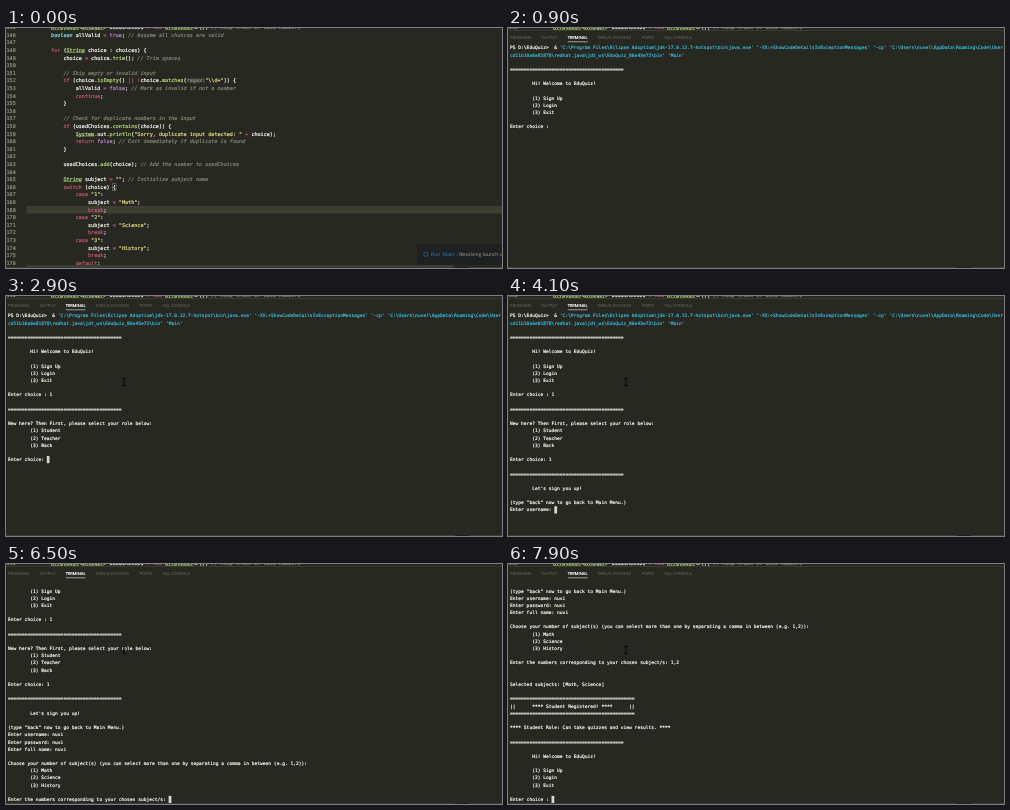
An HTML page that plays this animation: 496x240 px, repeating every 8 s.

```html
<!DOCTYPE html>
<html lang="en">
<head>
<meta charset="utf-8">
<title>Quiz terminal session</title>
<style>
  html, body { margin: 0; width: 100%; height: 100%; overflow: hidden; background: #272822; }
  /* Laid out at ten times the size so rows and glyphs can sit between pixels. */
  #stage {
    position: absolute; left: 0; top: 0; width: 4960px; height: 2400px; overflow: hidden;
    transform: scale(.1); transform-origin: 0 0;
    background: #272822; color: #fafaf4; text-rendering: geometricPrecision;
  }
  #stage > *, #panel > *, #cursor { position: absolute; }
  pre { margin: 0; font-family: "DejaVu Sans Mono", monospace; white-space: pre; -webkit-text-stroke: 2px; }

  #code, #numbers { top: -44px; font-size: 51.2px; line-height: 76px; }
  #code { left: 204px; }
  #numbers { left: 5px; color: #90918a; }
  #current { left: 205px; right: 0; top: 1780px; height: 76px; background: #3e3d32; }
  #scrollbar { left: 205px; width: 4265px; top: 2370px; height: 30px; background: #3a3b33; }
  .comment { color: #86826f; font-style: italic; }
  .string { color: #e6db84; }
  .keyword { color: #c0566f; }
  .constant { color: #b884d0; }
  .storage { color: #80dcf0; font-style: italic; }
  .type { color: #bcdc94; text-decoration: underline #a6d83e; }
  .call { color: #b4dc70; }
  .hint { color: #8b8b80; background: #34352e; }
  .bracket { outline: 5px solid #8c8c78; }

  #panel {
    left: 0; right: 0; top: 20px; bottom: 0; background: #272822;
    border-top: 6px solid #414339; box-sizing: border-box; animation: panel 8s infinite;
  }
  #tabs {
    left: 20px; top: 19px; display: flex; gap: 102px; white-space: nowrap;
    font: 41px/90px "Open Sans", sans-serif; color: #74756c;
  }
  #tabs b { font-weight: 400; color: #fff; border-bottom: 7px solid #d0d0c8; -webkit-text-stroke: 2px; }
  #terminal { left: 20px; top: 136px; font-size: 46px; line-height: 71.9px; }
  #terminal i { font-style: normal; color: #3cb4d4; }
  #cursor { width: 1ch; height: 1lh; background: #d8d8d0; }

  #toast {
    left: 4110px; top: 2160px; width: 900px; height: 210px; background: #1e2021;
    font: 50px/210px "Open Sans", sans-serif; color: #a4a59f; white-space: nowrap;
    animation: toast 8s infinite;
  }
  #toast span { position: absolute; left: 140px; }
  #toast em { font-style: normal; color: #327fc0; }
  #toast::before {
    content: ""; position: absolute; left: 64px; top: 80px; width: 36px; height: 36px;
    border: 6px solid #327fc0; border-radius: 50%;
  }
  #edge {
    left: 0; right: 0; bottom: 0; height: 10px;
    background: linear-gradient(90deg, #3c3d36 4490px, #1e1f1b 0 4630px, #3c3d36 0);
  }
  #mouse { left: 1160px; top: 820px; animation: mouse 8s infinite; }

  @keyframes panel { 0%, 2.49% { opacity: 0 } 2.5%, 100% { opacity: 1 } }
  @keyframes toast { 0%, 6.24% { opacity: 1 } 6.25%, 100% { opacity: 0 } }
  @keyframes mouse {
    0%, 18.74% { opacity: 0; transform: translate(3760px, -820px) }
    18.75% { opacity: 1; transform: translate(3760px, -820px); animation-timing-function: ease-out }
    22%, 100% { opacity: 1; transform: none }
  }
</style>
</head>
<body>
<div id="stage">
  <div id="current"></div>
  <pre id="numbers"></pre>
  <pre id="code"></pre>
  <div id="scrollbar"></div>
  <div id="panel">
    <div id="tabs">
      <span>PROBLEMS</span><span>OUTPUT</span><b>TERMINAL</b>
      <span>DEBUG CONSOLE</span><span>PORTS</span><span>SQL CONSOLE</span>
    </div>
    <pre id="terminal"><span id="output"></span><span id="cursor"></span></pre>
  </div>
  <div id="toast"><span><em>Run 'Main'</em> : Resolving launch configuration</span></div>
  <div id="edge"></div>
  <svg id="mouse" width="40" height="80" viewBox="0 0 4 8" fill="none" stroke="#050505" stroke-width=".9">
    <path d="M.3.5H3.7M2 .5V7.5M.3 7.5H3.7"/>
  </svg>
</div>
<script>
const LOOP = 8000, ROWS = 31, FOCUS_AT = 2000;
const byId = id => document.getElementById(id);
const escapeHtml = s => s.replace(/&/g, '&amp;').replace(/</g, '&lt;');

// Editor
const source = String.raw`        ArrayList<Integer> usedChoices = new ArrayList<>(); // Keep track of used numbers
        boolean allValid = true; // Assume all choices are valid

        for (String choice : choices) {
            choice = choice.trim(); // Trim spaces

            // Skip empty or invalid input
            if (choice.isEmpty() || !choice.matches(regex:"\\d+")) {
                allValid = false; // Mark as invalid if not a number
                continue;
            }

            // Check for duplicate numbers in the input
            if (usedChoices.contains(choice)) {
                System.out.println("Sorry, duplicate input detected: " + choice);
                return false; // Exit immediately if duplicate is found
            }

            usedChoices.add(choice); // Add the number to usedChoices

            String subject = ""; // Initialize subject name
            switch (choice) {
                case "1":
                    subject = "Math";
                    break;
                case "2":
                    subject = "Science";
                    break;
                case "3":
                    subject = "History";
                    break;
                default:`;
const rules = {
  comment: /\/\/.*/,
  string: /"[^"]*"/,
  hint: /regex:/,
  bracket: /(?<=switch \(choice\) )\{/,
  keyword: /\b(?:for|if|new|return|continue|switch|case|break|default)\b|[=+!|]+/,
  constant: /\b(?:true|false)\b/,
  storage: /\bboolean\b/,
  type: /\b(?:ArrayList|Integer|String|System)\b/,
  call: /\b\w+(?=\()/
};
const token = new RegExp(Object.entries(rules).map(([name, r]) => `(?<${name}>${r.source})`).join('|'), 'g');

function highlight(text) {
  let html = '', end = 0;
  for (const m of text.matchAll(token)) {
    const name = Object.keys(rules).find(k => m.groups[k] !== undefined);
    html += escapeHtml(text.slice(end, m.index)) + `<span class="${name}">${escapeHtml(m[0])}</span>`;
    end = m.index + m[0].length;
  }
  return html + escapeHtml(text.slice(end));
}
byId('code').innerHTML = highlight(source);
byId('numbers').textContent = source.split('\n').map((_, i) => 145 + i).join('\n');

// Terminal session: text appended at given times
const rule = n => '='.repeat(n);
const options = (...names) => names.map((name, i) => `        (${i + 1}) ${name}\n`).join('');
const menu = `\n${rule(41)}\n\n        Hi! Welcome to EduQuiz!\n\n${options('Sign Up', 'Login', 'Exit')}\nEnter choice : `;
const command = String.raw`PS D:\EduQuiz>  & 'C:\Program Files\Eclipse Adoptium\jdk-17.0.12.7-hotspot\bin\java.exe' '-XX:+ShowCodeDetailsInExceptionMessages' '-cp' 'C:\Users\nuvel\AppData\Roaming\Code\User
cd11b10a6e81878\redhat.java\jdt_ws\EduQuiz_86e45e72\bin' 'Main'
`;
const events = [];
const print = (at, text) => events.push({ at, text });
const type = (at, text, gap = 100) => [...text].forEach((c, i) => print(at + i * gap, c));

print(700, command);
print(900, menu);
type(2500, '1');
print(2800, `\n\n${rule(41)}\n\nNew here? Then First, please select your role below:\n${options('Student', 'Teacher', 'Back')}\nEnter choice: `);
type(3400, '1');
print(3800, `\n\n${rule(41)}\n\n        Let's sign you up!\n\n(type "back" now to go back to Main Menu.)\nEnter username: `);
type(4300, 'nuvi');
print(4800, '\nEnter password: ');
type(5000, 'nuvi');
print(5600, '\nEnter full name: ');
type(5800, 'nuvi');
print(6400, `\n\nChoose your number of subject(s) (you can select more than one by separating a comma in between (e.g. 1,2)):\n${options('Math', 'Science', 'History')}\nEnter the numbers corresponding to your chosen subject/s: `);
type(7000, '1,2', 200);
print(7700, `\n\n\nSelected subjects: [Math, Science]\n\n${rule(45)}\n||      **** Student Registered! ****      ||\n${rule(45)}\n\n**** Student Role: Can take quizzes and view results. ****\n${menu}`);

const output = byId('output'), cursor = byId('cursor');
const paint = (line, i) => i < 2 ? escapeHtml(line).replace(/('C|cd11).*/, '<i>$&</i>') : escapeHtml(line);
let shown = -1;

function draw(t) {
  const past = events.filter(e => e.at <= t);
  if (past.length !== shown) {
    shown = past.length;
    const lines = past.map(e => e.text).join('').split('\n');
    const visible = lines.map(paint).slice(-ROWS);
    output.innerHTML = visible.join('\n');
    cursor.style.left = `${lines.at(-1).length}ch`;
    cursor.style.top = `${visible.length - 1}lh`;
  }
  const last = Math.max(FOCUS_AT, past.length ? past.at(-1).at : 0);
  cursor.style.visibility = t >= FOCUS_AT && (t - last) % 1000 < 500 ? 'visible' : 'hidden';
}

const start = performance.now();
function frame() {
  draw((performance.now() - start) % LOOP);
  requestAnimationFrame(frame);
}
frame();
</script>
</body>
</html>
```
